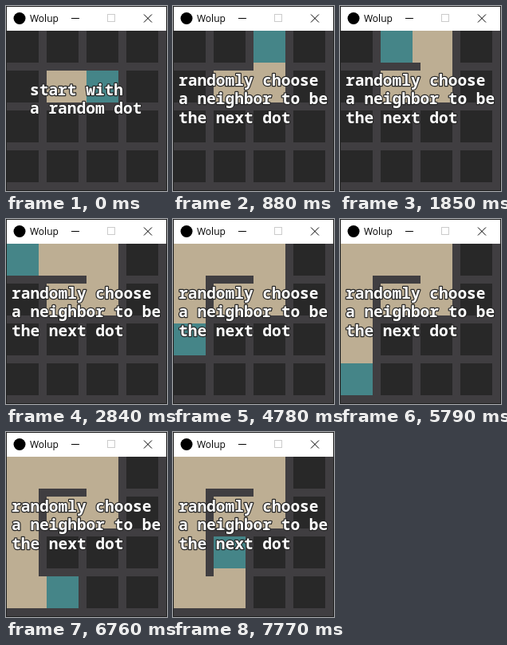
Recreate the animation shown at these times as an HTML page. Size 202x232 px, loop 8 s.

```html
<!DOCTYPE html>
<html lang="en">
<head>
<meta charset="utf-8">
<title>Maze walk</title>
<style>
  html, body { margin: 0; width: 202px; height: 232px; overflow: hidden; }
  svg { display: block; }
  .title { font: 12px "Open Sans", "Noto Sans", sans-serif; }
  #caption {
    font: 600 19.5px "Noto Sans Mono", "DejaVu Sans Mono", monospace;
    fill: #fff; stroke: #282828; stroke-width: 2.4px; stroke-linejoin: round;
    paint-order: stroke; white-space: pre;
  }
</style>
</head>
<body>
<svg width="202" height="232" viewBox="0 0 202 232">
  <defs>
    <pattern id="cells" x="1" y="31" width="50" height="50" patternUnits="userSpaceOnUse">
      <rect width="40" height="40" fill="#282828"/>
    </pattern>
  </defs>
  <rect width="202" height="232" fill="#202020"/>
  <rect x="1" y="1" width="200" height="30" fill="#fff"/>
  <circle cx="17" cy="15.5" r="7.5"/>
  <text class="title" x="30" y="20">Wolup</text>
  <g fill="none" stroke="#000">
    <path d="M82 15.5h10"/>
    <rect x="127.5" y="10.5" width="9" height="9" stroke="#ccc"/>
    <path d="M173 10.5l10 10M183 10.5l-10 10"/>
  </g>
  <rect x="1" y="31" width="200" height="200" fill="#403e41"/>
  <rect x="1" y="31" width="200" height="200" fill="url(#cells)"/>
  <polyline id="trail" fill="none" stroke="#bdae93" stroke-width="40" stroke-linecap="square"/>
  <rect id="dot" width="40" height="40" fill="#458588"/>
  <g id="caption"></g>
</svg>
<script>
  const LOOP = 8000;
  const moves = [880, 1850, 2840, 3790, 4780, 5790, 6760, 7770];
  // Visited cells as [column, row]; the first two are there from the start.
  const route = [[1, 1], [2, 1], [2, 0], [1, 0], [0, 0], [0, 1], [0, 2], [0, 3], [1, 3], [1, 2]];
  const intro = { x: 30, y: 112, lines: ["start with", "a random dot"] };
  const rule = { x: 7, y: 100, lines: ["randomly choose", "a neighbor to be", "the next dot"] };

  const [trail, dot, caption] = ["trail", "dot", "caption"].map(id => document.getElementById(id));
  let shown = -1;

  function show(step) {
    const path = route.slice(0, step + 2);
    const [col, row] = path[path.length - 1];
    trail.setAttribute("points", path.map(([c, r]) => [21 + 50 * c, 51 + 50 * r]).join(" "));
    dot.setAttribute("x", 1 + 50 * col);
    dot.setAttribute("y", 31 + 50 * row);
    const { x, y, lines } = step ? rule : intro;
    caption.innerHTML = lines.map((line, i) =>
      `<text x="${x}" y="${y + 23.3 * i}">${line}</text>`).join("");
  }

  function frame() {
    const time = performance.now() % LOOP;
    const step = moves.filter(t => t <= time).length;
    if (step !== shown) show(shown = step);
    requestAnimationFrame(frame);
  }
  frame();
</script>
</body>
</html>
```
